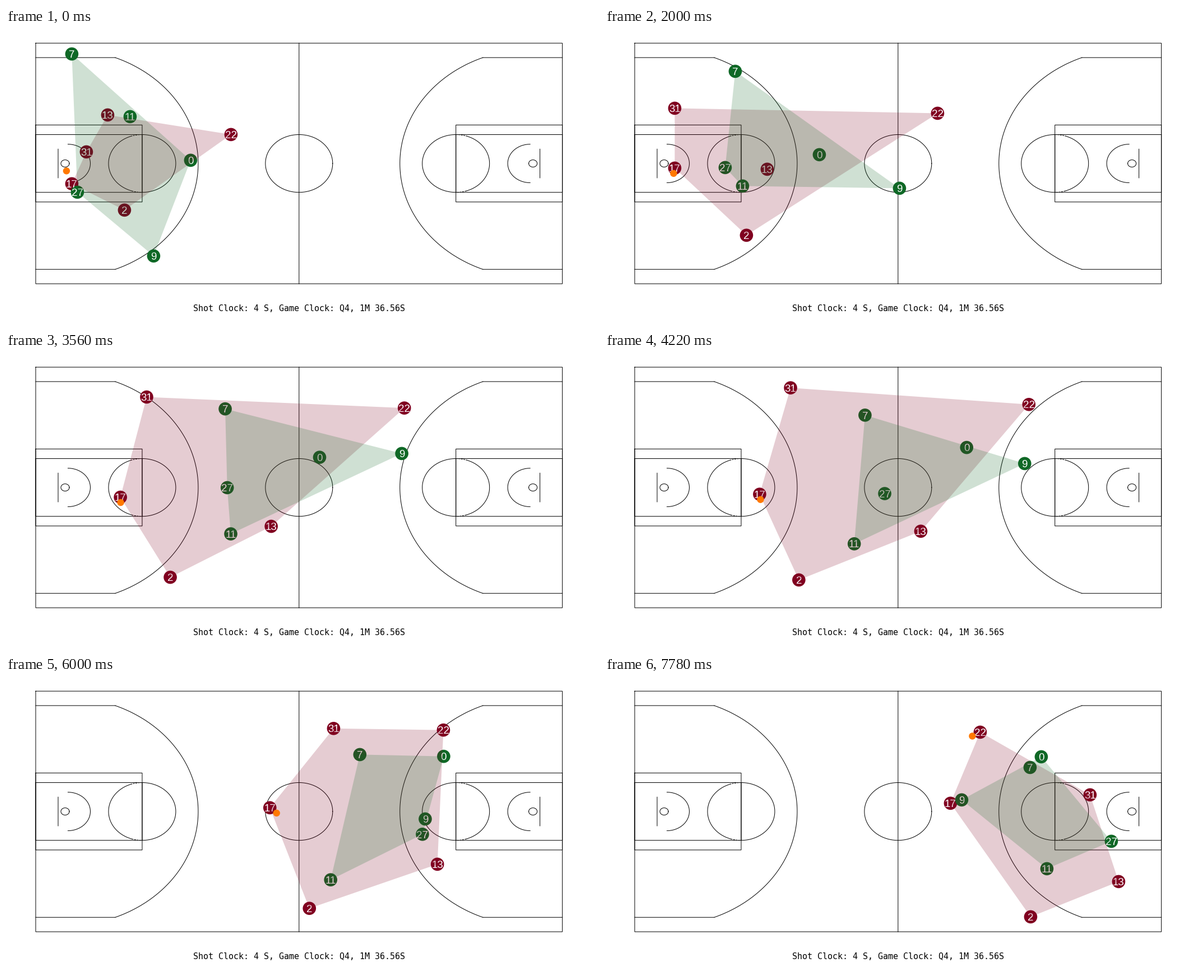
Animation, 1058 px wide and 529 px high, one loop 8000 ms. Source, as a matplotlib script:

```python
import numpy as np
import matplotlib.pyplot as plt
from matplotlib.animation import FuncAnimation
from matplotlib.patches import Circle, Polygon

W, H, DPI = 1058, 529, 64
PT = 72 / DPI  # points per pixel
STEPS, TICKS, TICK_MS = 36, 200, 40

RED, GREEN, ORANGE = "#800020", "#0f6826", "#ff7800"

# Court of 94 by 50 feet
LEFT, TOP, FT_X, FT_Y = 53, 27.1, 9.996, 8.6
LENGTH, WIDTH = 94, 50

# Positions at the key steps; a smooth curve joins them
KEYS = np.array([0, 9, 14, 23, 35])
RED_TEAM = {
    "13": [(181, 155), (289, 252), (414, 300), (676, 326), (916, 367)],
    "22": [(401, 190), (593, 152), (677, 110), (791, 94), (669, 100)],
    "31": [(143, 221), (124, 143), (204, 96), (452, 63), (865, 212)],
    "17": [(117, 278), (124, 250), (167, 259), (380, 243), (616, 227)],
    "2": [(211, 325), (252, 370), (270, 396), (438, 410), (759, 430)],
}
GREEN_TEAM = {
    "7": [(117, 46), (232, 77), (342, 94), (554, 127), (758, 163)],
    "11": [(221, 158), (245, 282), (362, 313), (500, 360), (788, 344)],
    "0": [(329, 236), (382, 226), (501, 200), (736, 152), (778, 144)],
    "9": [(263, 407), (525, 286), (664, 190), (768, 240), (636, 221)],
    "27": [(127, 293), (214, 249), (331, 239), (634, 270), (903, 295)],
}


def track(points):
    """Natural cubic spline through the key points, one row per step."""
    p, t, n = np.array(points) + 0.4, KEYS, len(KEYS)
    h = np.diff(t)
    slope = np.diff(p, axis=0) / h[:, None]
    a, b = np.eye(n), np.zeros_like(p)
    for i in range(1, n - 1):
        a[i, i - 1:i + 2] = h[i - 1], 2 * (h[i - 1] + h[i]), h[i]
        b[i] = 6 * (slope[i] - slope[i - 1])
    m = np.linalg.solve(a, b)
    steps = np.arange(STEPS)
    k = np.clip(np.searchsorted(t, steps, side="right") - 1, 0, n - 2)
    d, hk = (steps - t[k])[:, None], h[k][:, None]
    return (p[k] + d * (slope[k] - hk * (2 * m[k] + m[k + 1]) / 6)
            + d ** 2 * m[k] / 2 + d ** 3 * (m[k + 1] - m[k]) / (6 * hk))


def ball_track(passer, receiver, start=30, end=34):
    """Ball stays by the passer, then flies straight to the receiver."""
    steps = np.arange(STEPS)
    dx = np.interp(steps, [0, 9, 19, 23], [-9.5, -2, 1.5, 12])
    dy = np.interp(steps, [0, 9], [-23, 9.5])
    held = passer + np.column_stack([dx, dy])
    caught = receiver + (-14, 7)
    u = np.clip((steps - start) / (end - start), 0, 1)[:, None]
    path = (1 - u) * held[start] + u * caught[end]
    path[:start], path[end:] = held[:start], caught[end:]
    return path


def hull(points):
    pts = sorted(map(tuple, points))

    def chain(seq):
        out = []
        for x, y in seq:
            while len(out) > 1:
                (ax, ay), (bx, by) = out[-2:]
                if (bx - ax) * (y - ay) - (by - ay) * (x - ax) > 0:
                    break
                out.pop()
            out.append((x, y))
        return out[:-1]

    return chain(pts) + chain(pts[::-1])


fig = plt.figure(figsize=(W / DPI, H / DPI), dpi=DPI, facecolor="white")
ax = fig.add_axes([0, 0, 1, 1])
ax.set(xlim=(0, W), ylim=(H, 0))
ax.axis("off")


def line(xs, ys, flip=False, **kw):
    """Line in feet: x from the baseline, y from the long axis."""
    xs = np.asarray(xs, float)
    xs = LENGTH - xs if flip else xs
    ax.plot(LEFT + FT_X * xs, TOP + FT_Y * (np.asarray(ys) + WIDTH / 2),
            color="black", lw=PT, zorder=1, snap=False, **kw)


def box(length, width, flip=False):
    y = width / 2
    line([0, length, length, 0, 0], [-y, -y, y, y, -y], flip,
         solid_joinstyle="miter")


def arc(cx, r, a0, a1, flip=False, **kw):
    a = np.radians(np.linspace(a0, a1, 120))
    line(cx + r * np.cos(a), -r * np.sin(a), flip, **kw)


def draw_end(flip):
    hoop, lane, corner, three = 5.25, 19, 22, 23.75
    lim = np.degrees(np.arcsin(corner / three))
    arc(hoop, three, -lim, lim, flip)
    reach = hoop + three * np.cos(np.radians(lim))
    for y in (-corner, corner):
        line([0, reach], [y, y], flip)

    box(lane, 16, flip)
    box(lane, 12, flip)
    arc(lane, 6, -90, 90, flip)
    arc(lane, 6, 108, 252, flip)
    for a0 in (90, 252):
        arc(lane, 6, a0, a0 + 18, flip, dashes=(3, 1.5))

    line([4, 4], [-3, 3], flip)
    arc(hoop, 0.75, 0, 360, flip)
    arc(hoop + 0.5, 4, -90, 90, flip)


box(LENGTH, WIDTH)
line([LENGTH / 2] * 2, [-WIDTH / 2, WIDTH / 2])
arc(LENGTH / 2, 6, 0, 360)
draw_end(False)
draw_end(True)

ax.text(523, 505.5, "Shot Clock: 4 S, Game Clock: Q4, 1M 36.56S",
        family="DejaVu Sans Mono", size=15 * PT, ha="center", va="baseline")


class Team:
    def __init__(self, players, color, z):
        self.paths = [track(p) for p in players.values()]
        self.discs = [ax.add_patch(Circle((0, 0), 11.8, fc=color, ec="none",
                                          zorder=z)) for _ in players]
        self.labels = [ax.text(0, 0, n, color="white", size=18.7 * PT,
                               family="Liberation Sans", ha="center",
                               va="baseline", zorder=4) for n in players]
        self.area = ax.add_patch(Polygon([(0, 0)] * 3, fc=color, ec="none",
                                         lw=0, alpha=0.2, zorder=z + 3))

    def move(self, step):
        spots = [p[step] for p in self.paths]
        for (x, y), disc, label in zip(spots, self.discs, self.labels):
            disc.center = (x, y)
            label.set_position((x, y + 6.7))
        self.area.set_xy(hull(spots))


teams = [Team(RED_TEAM, RED, 2), Team(GREEN_TEAM, GREEN, 3)]
ball_path = ball_track(track(RED_TEAM["17"]), track(RED_TEAM["22"]))
ball = ax.add_patch(Circle((0, 0), 6.2, fc=ORANGE, ec="none", zorder=8))


def update(tick):
    # Each step shows from the tick in which it begins
    step = (tick * STEPS + STEPS - 1) // TICKS
    for team in teams:
        team.move(step)
    ball.center = tuple(ball_path[step])
    return []


anim = FuncAnimation(fig, update, frames=TICKS, interval=TICK_MS,
                     repeat=True, repeat_delay=0, blit=False)
plt.show()
```
